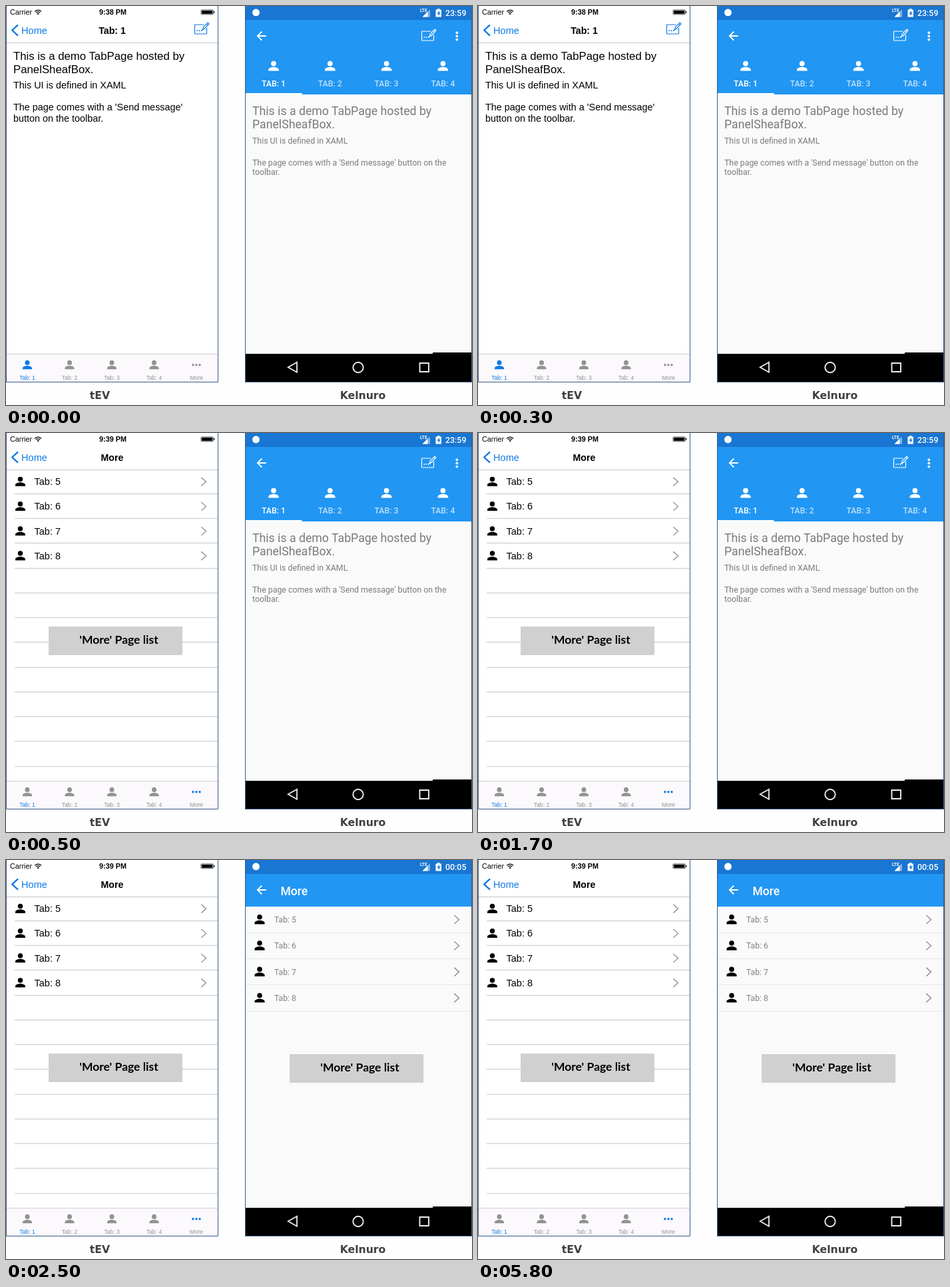
An HTML page for the animation above (8 s loop, 700x600 px).

```html
<!DOCTYPE html>
<html lang="en">
<head>
<meta charset="utf-8">
<title>Tabbed page demo</title>
<style>
  html, body { margin: 0; width: 100%; height: 100%; overflow: hidden; background: #fefefe; }
  svg { display: block; width: 700px; height: 600px; }
  .sans { font-family: "Liberation Sans", Arial, sans-serif; }
  .robo { font-family: Roboto, sans-serif; }
  .note { font: 700 17.5px Lato, sans-serif; }
  .cap { font: 700 15.7px "DejaVu Sans", sans-serif; fill: #404040; }
  .mid { text-anchor: middle; }
  .bold { font-weight: 700; }
  .med { font-weight: 500; }
</style>
</head>
<body>
<svg id="stage" viewBox="0 0 700 600"></svg>
<script>
const LOOP = 8000, LEFT_SWITCH = 500, RIGHT_SWITCH = 2500;
const BLUE = '#0f7be6', GREY = '#929292', BORDER = '#385d8a';

const text = (x, y, size, str, cls, fill = '#000') =>
  `<text x="${x}" y="${y}" font-size="${size}" class="${cls}" fill="${fill}">${str}</text>`;
const rect = (x, y, w, h, fill) =>
  `<rect x="${x}" y="${y}" width="${w}" height="${h}" fill="${fill}"/>`;
const dot = (x, y, r, fill) => `<circle cx="${x}" cy="${y}" r="${r}" fill="${fill}"/>`;
const line = (d, stroke, width = 1) =>
  `<path d="${d}" fill="none" stroke="${stroke}" stroke-width="${width}"/>`;
const group = (id, body) => `<g id="${id}">${body}</g>`;
const each = (n, fn) => Array.from({ length: n }, (_, i) => fn(i)).join('');

const person = (x, y, scale, fill, id = '') =>
  `<path ${id && `id="${id}"`} fill="${fill}" transform="translate(${x} ${y}) scale(${scale})"
    d="M0-8a4 4 0 0 1 0 8a4 4 0 0 1 0-8M0 1.2c-2.7 0-8 1.3-8 4v2H8v-2c0-2.7-5.3-4-8-4z"/>`;
const chevron = (x, y, stroke) => line(`M${x} ${y - 6.5}l7.2 6.5l-7.2 6.5`, stroke, 1.2);

// Message box with a pencil
const compose = (x, y, color) => `<g transform="translate(${x} ${y})">
  ${line('M14.5 3.5H1.5Q.5 3.5 .5 4.5V16.5Q.5 17.5 1.5 17.5H17.5Q18.5 17.5 18.5 16.5V8.5', color, 1.2)}
  ${line('M12 11.5l1.2-3.6L20 .6l2 1.8l-7 7.5zM18.3 2.4l2 1.8', color, 1.2)}
  ${each(3, i => dot(4.3 + i * 3.2, 12.5, .95, color))}</g>`;

const note = (x, y) => rect(x, y, 201, 43, '#d0d0d0') +
  `<text x="${x + 105.5}" y="${y + 26}" class="note mid">'More' Page list</text>`;

function leftPhone() {
  const status = text(6, 13, 10.8, 'Carrier', 'sans') +
    line('M43.3 8.2Q48.2 4.2 53 8.2M45 10.1Q48.2 7.5 51.3 10.1', '#000', 1.3) +
    '<path d="M46.4 11.4Q48.2 10 50 11.4L48.2 13.3z"/>' +
    '<rect x="292.8" y="5.8" width="18.6" height="7" rx="1.4" fill="none" stroke="#000" stroke-width=".6"/>' +
    rect(293.9, 6.8, 16.4, 5, '#000') + rect(312, 8, 1.3, 2.6, '#000') +
    `<text id="clock" x="160.5" y="13" font-size="10.8" class="sans bold mid"></text>`;
  const nav = line('M18 28.3L9.3 36.5L18 44.7', BLUE, 2.4) + text(23, 41.5, 14.6, 'Home', 'sans', BLUE) +
    `<text id="title" x="159.5" y="41.5" font-size="14.2" class="sans bold mid"></text>` +
    line('M1 55.5H318', '#c8c8c8');
  const page = group('leftPage', compose(283, 24.5, BLUE) +
    text(11, 81, 16.8, 'This is a demo TabPage hosted by', 'sans') +
    text(11, 101, 16.8, 'PanelSheafBox.', 'sans') +
    text(11, 124, 14.4, 'This UI is defined in XAML', 'sans') +
    text(11, 157, 14.4, "The page comes with a 'Send message'", 'sans') +
    text(11, 174, 14.4, 'button on the toolbar.', 'sans'));
  const list = group('leftList',
    each(12, i => line(`M13 ${Math.round(90.9 + i * 37.25) + .5}H318`, '#c8c8c8')) +
    each(4, i => {
      const y = 73.2 + i * 37.2;
      return person(21.5, y, .93, '#000') + text(42.5, y + 4.9, 14.5, 'Tab: ' + (i + 5), 'sans') +
        chevron(293.3, y, '#858585');
    }) + note(64, 291));
  const tabs = rect(1, 523, 317, 42, '#fcf9fd') + line('M1 523.5H318', '#cfccd0') +
    each(4, i => {
      const x = 32 + i * 63.5;
      return person(x, 539.9, .88, GREY, 'tab' + i) +
        text(x, 562, 8.7, 'Tab: ' + (i + 1), 'sans mid', i ? GREY : BLUE);
    }) +
    group('dots', each(3, i => dot(280.8 + i * 5.1, 539.7, 1.75, 'currentColor'))) +
    text(286, 562, 8.8, 'More', 'sans mid', GREY);
  return rect(0, 0, 319, 565, '#fff') + status + nav + page + list + tabs +
    line('M.5 0V565.5H318.5V0', BORDER);
}

function rightPhone() {
  const soft = '#bcdffb', ink = '#7b7b7b';
  const base = rect(359, 0, 341, 566, '#fafafa') + rect(359, 0, 341, 21, '#1976d2') +
    dot(375.5, 9.8, 5.5, '#fff') +
    text(622, 9, 6.5, 'LTE', 'robo bold', '#fff') +
    '<path d="M625.5 16.5L637 5V16.5z" fill="#7fb2e6"/><path d="M625.5 16.5L633.5 8.5V16.5z" fill="#fff"/>' +
    '<path d="M648 4h3.5v1.5h2.5V16.5h-8.5V5.5h2.5z" fill="#fff"/>' +
    '<path d="M650.8 7l-3.4 4.6h2v3.4l3.2-4.8h-1.8z" fill="#1976d2"/>' +
    '<text id="rightClock" x="660" y="15" font-size="12.4" class="robo med" fill="#fff"></text>';
  const page = group('rightPage', rect(359, 21, 341, 112, '#2196f3') + compose(624, 34.5, '#fff') +
    each(3, i => dot(677.3, 40.2 + i * 5.2, 1.9, '#fff')) +
    each(4, i => {
      const x = 402 + i * 84.8;
      return person(x, 90.5, .97, '#fff') +
        text(x, 121, 12.3, 'TAB: ' + (i + 1), 'robo med mid', i ? soft : '#fff');
    }) + rect(360, 131, 84.5, 2, '#fff') +
    text(370, 163.5, 17.7, 'This is a demo TabPage hosted by', 'robo', ink) +
    text(370, 184, 17.7, 'PanelSheafBox.', 'robo', ink) +
    text(370, 207, 12.35, 'This UI is defined in XAML', 'robo', ink) +
    text(370, 240, 12.35, "The page comes with a 'Send message' button on the", 'robo', ink) +
    text(370, 254, 12.35, 'toolbar.', 'robo', ink));
  const list = group('rightList', rect(359, 21, 341, 49, '#2196f3') +
    text(412.5, 52.5, 17.5, 'More', 'robo med', '#fff') +
    each(4, i => {
      const y = 89.6 + i * 39.3;
      return person(381, y, .95, '#000') + text(403, y + 4.5, 12.2, 'Tab: ' + (i + 5), 'robo', '#828282') +
        chevron(673.3, y, '#7c7c7c') + line(`M360 ${Math.round(y + 19) + .5}H699`, '#e6e6e6');
    }) + note(426, 292));
  const arrow = line('M391 45H378M384.3 38.5L377.8 45L384.3 51.5', '#fff', 1.8);
  const keys = rect(359, 523, 341, 43, '#000') + rect(641, 521, 59, 2, '#000') +
    line('M423.8 543.3L437 535.8V550.8z', '#eee', 1.8) +
    '<circle cx="529" cy="543.5" r="7.7" fill="none" stroke="#eee" stroke-width="1.9"/>' +
    line('M621.5 537H635V550H621.5z', '#eee', 1.9);
  return base + page + list + arrow + keys + line('M359.5 0V565.5H699.5V0', BORDER);
}

const $ = id => document.getElementById(id);
$('stage').innerHTML = leftPhone() + rightPhone() +
  '<text x="141" y="591" class="cap mid">tEV</text><text x="536" y="591" class="cap mid">Kelnuro</text>';

const show = (id, on) => $(id).setAttribute('display', on ? 'inline' : 'none');

function render(t) {
  const more = t >= LEFT_SWITCH, rightMore = t >= RIGHT_SWITCH;
  show('leftPage', !more);
  show('leftList', more);
  show('rightPage', !rightMore);
  show('rightList', rightMore);
  $('clock').textContent = more ? '9:39 PM' : '9:38 PM';
  $('title').textContent = more ? 'More' : 'Tab: 1';
  $('rightClock').textContent = rightMore ? '00:05' : '23:59';
  $('tab0').setAttribute('fill', more ? GREY : BLUE);
  $('dots').setAttribute('color', more ? BLUE : GREY);
}

const start = performance.now();
function tick() {
  render((performance.now() - start) % LOOP);
  requestAnimationFrame(tick);
}
tick();
</script>
</body>
</html>
```
